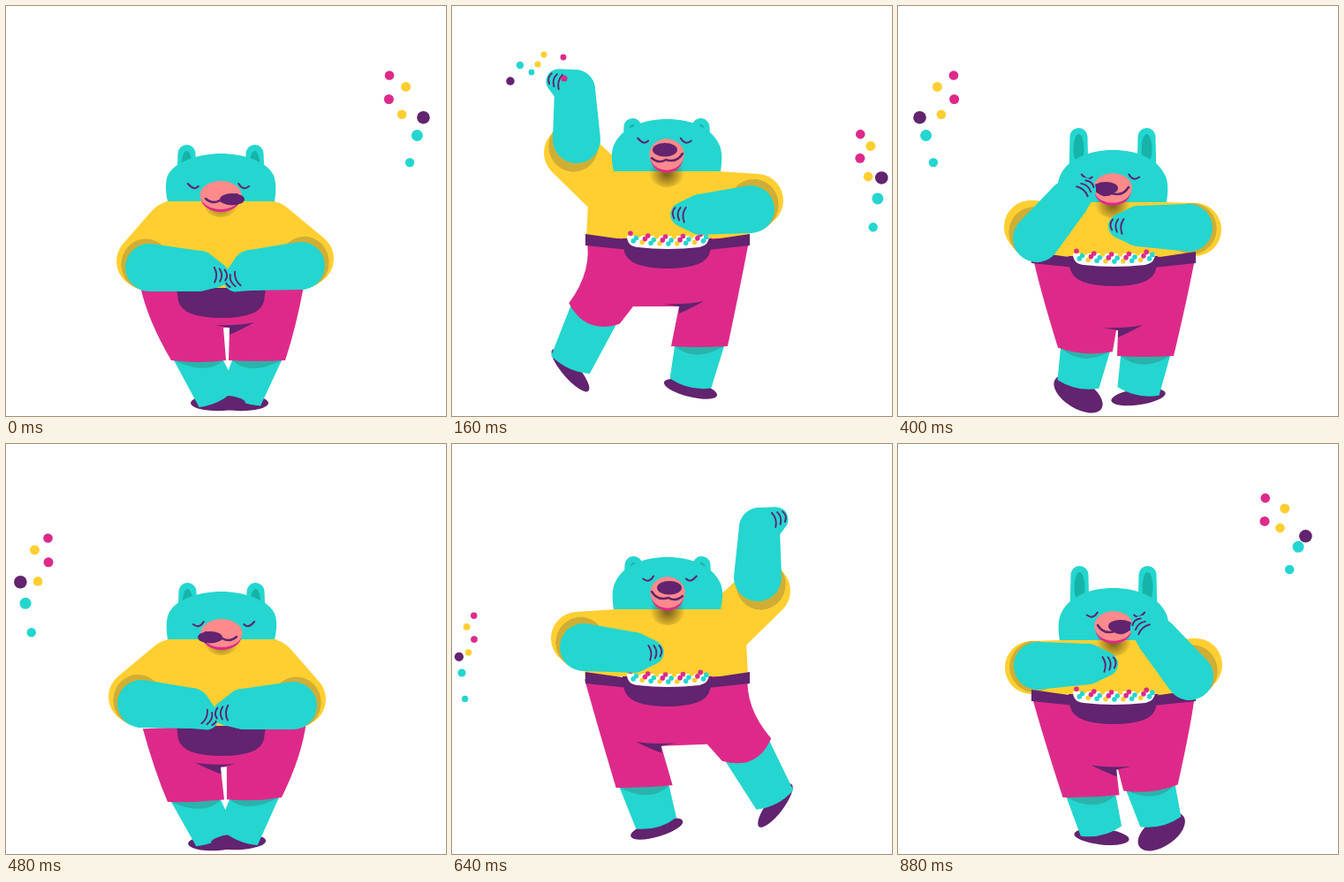
These frames come from a looping animation (498 by 464 pixels, 0.96 s). An HTML page with a canvas:

```html
<!DOCTYPE html>
<html lang="en">
<head>
<meta charset="utf-8">
<title>Dancing bear</title>
<style>
html, body { margin: 0; width: 100%; height: 100%; overflow: hidden; background: #fff; }
canvas { display: block; }
</style>
</head>
<body>
<canvas id="stage" width="498" height="464"></canvas>
<script>
const ctx = document.getElementById('stage').getContext('2d');
const TEAL = '#24d6cf', TEAL_DARK = '#2ab3ab', YELLOW = '#ffcf31', YELLOW_DARK = '#d0ae35';
const PINK = '#dd2a8a', PURPLE = '#62236f', SALMON = '#ff8a8c';
const STEP = 80, STEPS = 12, HALF = 6, WIDTH = 498;
const rad = deg => deg * Math.PI / 180;

// head: neck y, top y, ear tip y      face: height above neck, turn
// arm: elbow x, y, forearm and paw angles, cuff drop below the elbow
// leg: hem x, y, ankle x, y, foot angle, foot thickness
// crotch: left x, right x, y
const crouch = {
  head: [221, 167, 157], face: [6, 13], bowl: [353], crotch: [246, 253, 364],
  armL: [162, 296, 4, 12, -7], armR: [334, 294, 175, 150, -8],
  legL: [218, 401, 240, 443, 0, 9], legR: [284, 401, 266, 443, 0, 9]
};
const fling = {
  head: [187, 128, 127], face: [18, -2], bowl: [297], crotch: [205, 257, 340],
  armL: [141, 151, -92, -152, 15], armR: [338, 230, 174, 180, -10],
  legL: [161, 348, 134, 406, 49, 9], legR: [280, 385, 270, 427, 14, 9]
};
const swing = {
  head: [196, 137, 122], face: [22, -2], bowl: [302], crotch: [202, 257, 345],
  armL: [162, 178, -40, -22, -15], armR: [338, 231, 176, 186, -5],
  legL: [168, 346, 137, 366, 65, 19], legR: [280, 388, 270, 428, 12, 9]
};
const land = {
  head: [222, 163, 138], face: [15, -8], bowl: [317], crotch: [247, 249, 367],
  armL: [157, 263, -50, -35, -13], armR: [329, 251, 182, 180, 2],
  legL: [212, 389, 204, 428, 32, 16], legR: [280, 396, 272, 436, -8, 9]
};

const between = (a, b) => Object.fromEntries(
  Object.keys(a).map(key => [key, a[key].map((v, i) => (v + b[key][i]) / 2)]));
const poses = [crouch, between(crouch, fling), fling, between(fling, swing), swing, land];

// Confetti: colour, launch x, y, vertical speed, radius
const confetti = [
  [YELLOW, 97, 66, -13, 5.5], [YELLOW, 104, 55, 30, 5.3],
  [PINK, 126, 58, -18, 5.3], [PINK, 127, 82, -15, 5.5],
  [PURPLE, 66, 85, 3, 7.3], [TEAL, 77, 67, 42, 6.5], [TEAL, 90, 75, 65, 5.2]
];

function pathFill(d, color) {
  ctx.fillStyle = color;
  ctx.fill(new Path2D(d));
}

function pathStroke(d, color, width) {
  ctx.strokeStyle = color;
  ctx.lineWidth = width;
  ctx.lineCap = 'round';
  ctx.stroke(new Path2D(d));
}

function oval(x, y, rx, ry, color, deg = 0) {
  ctx.beginPath();
  ctx.ellipse(x, y, rx, ry, rad(deg), 0, Math.PI * 2);
  ctx.fillStyle = color;
  ctx.fill();
}

// Two circles joined by their outer tangents
function limb(x1, y1, r1, x2, y2, r2, color) {
  const angle = Math.atan2(y2 - y1, x2 - x1);
  const open = Math.acos(Math.max(-1, Math.min(1, (r1 - r2) / Math.hypot(x2 - x1, y2 - y1))));
  ctx.beginPath();
  ctx.arc(x1, y1, r1, angle + open, angle - open + Math.PI * 2);
  ctx.arc(x2, y2, r2, angle - open, angle + open);
  ctx.fillStyle = color;
  ctx.fill();
}

// End points and bulging middle of a trouser hem
function hem([x, y], tilt, half, bulge) {
  const c = Math.cos(rad(tilt)), s = Math.sin(rad(tilt));
  return {
    left: [x - c * half, y - s * half],
    mid: [x - s * bulge * 2, y + c * bulge * 2],
    right: [x + c * half, y + s * half]
  };
}

function drawShin([hx, hy, ax, ay, footAngle, thick], tilt) {
  oval(ax, ay + thick * .7, 31, thick, PURPLE, footAngle);
  const d = Math.hypot(ax - hx, ay - hy), ux = (ax - hx) / d, uy = (ay - hy) / d;
  const { left, right } = hem([hx, hy], tilt, 28, 0), half = 24;
  pathFill(`M${left}L${ax - uy * half} ${ay + ux * half}` +
    `Q${ax + ux * 9} ${ay + uy * 9} ${ax + uy * half} ${ay - ux * half}L${right}Z`, TEAL);
  pathFill(`M${left}Q${hx + ux * 20} ${hy + uy * 20} ${right}Z`, TEAL_DARK);
}

function drawLegs(p) {
  const lift = p.legR[1] - p.legL[1], tilt = lift * .6;
  drawShin(p.legR, 0);
  drawShin(p.legL, tilt);
  const top = p.bowl[0] - 36, [x1, x2, y] = p.crotch;
  const l = hem(p.legL, tilt, 31, 2 + lift * .3), r = hem(p.legR, 0, 32, 1);
  pathFill(`M152 ${top}Q160 ${top + 38} ${l.left}Q${l.mid} ${l.right}L${x1} ${y}H${x2}` +
    `L${r.left}Q${r.mid} ${r.right}Q328 ${top + 48} 337 ${top}Z`, PINK);
  pathFill(`M${x2 - 18} ${y - 3}Q${x2 + 8} ${y - 2} ${x2 + 28} ${y - 6}Q${x2 + 12} ${y + 3} ${x2} ${y + 8}V${y}Z`, PURPLE);
}

function drawSleeve([ex, ey, , , drop], side, neck) {
  const cx = ex + side * 7, cy = ey + drop;
  limb(243.5 + side * 55, neck + 31, 31, cx, cy, 30, YELLOW);
  oval((cx + ex) / 2, (cy + ey) / 2, 28, 29, YELLOW_DARK);
}

function drawTorso(p) {
  const n = p.head[0], waist = p.bowl[0] - 34;
  pathFill(`M181 ${n}H304L335 ${n + 36}L337 ${waist}H152L154 ${n + 36}Z`, YELLOW);
}

function drawHead([n, top, ear]) {
  for (const x of [204.5, 281.5]) {
    limb(x, ear + 10, 10, x, n - 28, 11, TEAL);
    oval(x, ear + 24, 6, 17, '#16b3a8');
  }
  const brow = n - (n - top) * .83;
  pathFill(`M183 ${n}C180 ${n - 12} 180 ${n - 24} 184 ${n - 31}C192 ${brow} 218 ${top} 243 ${top}` +
    `C270 ${top} 294 ${brow} 302 ${n - 31}C306 ${n - 24} 306 ${n - 12} 304 ${n}Z`, TEAL);
}

function drawFace(p) {
  const n = p.head[0], [rise, turn] = p.face, tilt = Math.abs(turn);
  const x = 243, y = n - rise, rx = 19 + tilt * .35, ry = 19 - tilt * .15;
  const shade = ctx.createRadialGradient(x, n + 2, 3, x, n + 2, 20);
  shade.addColorStop(0, 'rgba(80,65,20,.7)');
  shade.addColorStop(1, 'rgba(80,65,20,0)');
  oval(x, n + 2, 20, 16, shade);
  oval(x, y + 2, rx - 1, ry - 1, PINK);
  oval(x, y - 1, rx, ry - 1, SALMON);
  oval(x + turn, y - 8 + tilt * .9, 14, 8 - tilt * .1, PURPLE);
  pathStroke(`M${x - 17} ${y + 3}Q${x - 9} ${y + 10} ${x - 1} ${y + 5}Q${x + 11} ${y + 9} ${x + 18} ${y - 2}`, PURPLE, 2.5);
  for (const side of [-1, 1]) {
    const ex = 240.5 + side * (23.5 + tilt * .4), ey = y - 18 + tilt * .5;
    pathStroke(`M${ex + side * 6} ${ey + side * 1.5 - 1}Q${ex - side} ${ey + 6} ${ex - side * 6} ${ey - side * 1.5 - 1}`, PURPLE, 2);
  }
}

function drawBowl(p) {
  const b = p.bowl[0], full = p !== crouch;
  if (full) {
    pathFill(`M151 ${b - 39}L200 ${b - 32}H290L337 ${b - 39}V${b - 26}L290 ${b - 21}H200L151 ${b - 26}Z`, PURPLE);
  }
  pathFill(`M193 ${b - 34}L195 ${b - 19}Q200 ${b} 244 ${b}Q288 ${b} 292 ${b - 19}L294 ${b - 34}Z`, PURPLE);
  if (!full) return;
  pathFill(`M198 ${b - 37}Q198 ${b - 25} 210 ${b - 24}Q244 ${b - 20} 280 ${b - 24}Q291 ${b - 26} 291 ${b - 37}Z`, '#fff');
  for (let i = 0; i < 27; i++) {
    const x = 202 + i * 3.3, rim = ((x - 245) / 45) ** 2 * 4;
    oval(x, b - 32 - rim + (i * 2 % 3 - 1) * 4, 2.8, 2.8, [PINK, YELLOW, TEAL][(i * 5 >> 1) % 3]);
  }
}

function drawArm([ex, ey, forearm, paw], side) {
  const wx = ex + Math.cos(rad(forearm)) * 56, wy = ey + Math.sin(rad(forearm)) * 56;
  const px = wx + Math.cos(rad(paw)) * 21, py = wy + Math.sin(rad(paw)) * 21;
  limb(ex, ey, 27, wx, wy, 23, TEAL);
  limb(wx, wy, 23, px, py, 14, TEAL);
  ctx.save();
  ctx.translate(px, py);
  ctx.rotate(rad(paw + side * 10));
  for (const x of [-2, 4, 10]) {
    const reach = 8 - x * .2;
    pathStroke(`M${x - 1} ${-reach}Q${x + 4} 0 ${x} ${reach}`, PURPLE, 1.9);
  }
  ctx.restore();
}

// One throw, rising and falling; later pieces catch up as they slow down
function drawBurst(step, start, mirrored) {
  const t = (step - start + STEPS) % STEPS / 2;
  const size = Math.min(1, .65 + t, 3.7 - t);
  if (size <= 0) return;
  for (const [color, x0, y0, speed, radius] of confetti) {
    const x = x0 - (20 + .24 * x0) * t + 5.5 * t * t;
    const y = y0 + speed * t + (17 - .23 * speed) * t * t;
    oval(mirrored ? WIDTH - 1 - x : x, y, radius * size, radius * size, color);
  }
}

function draw(step) {
  const p = poses[step % HALF], mirrored = step >= HALF;
  const upright = () => ctx.setTransform(1, 0, 0, 1, 0, 0);
  const flip = () => mirrored && ctx.setTransform(-1, 0, 0, 1, 487, 0);
  upright();
  ctx.fillStyle = '#fff';
  ctx.fillRect(0, 0, WIDTH, 464);
  // The mirrored half also leans a little below the waist
  if (mirrored) ctx.setTransform(-1, .04, .085, .997, 464.9, -7.4);
  drawLegs(p);
  flip();
  drawSleeve(p.armL, -1, p.head[0]);
  drawSleeve(p.armR, 1, p.head[0]);
  drawTorso(p);
  // Sleeve linings stay in front of the shirt
  for (const [arm, side] of [[p.armL, -1], [p.armR, 1]]) {
    ctx.save();
    ctx.beginPath();
    ctx.rect(side < 0 ? 0 : 310, 0, side < 0 ? 177 : 188, 464);
    ctx.clip();
    oval(arm[0] + side * 3.5, arm[1] + arm[4] / 2, 28, 29, YELLOW_DARK);
    ctx.restore();
  }
  drawHead(p.head);
  drawFace(p);
  upright();
  drawBowl(p);
  flip();
  drawArm(p.armR, 1);
  drawArm(p.armL, -1);
  upright();
  drawBurst(step, 2, false);
  drawBurst(step, 9, true);
}

const start = performance.now();
function tick() {
  draw(Math.floor((performance.now() - start) / STEP) % STEPS);
  requestAnimationFrame(tick);
}
tick();
</script>
</body>
</html>
```
